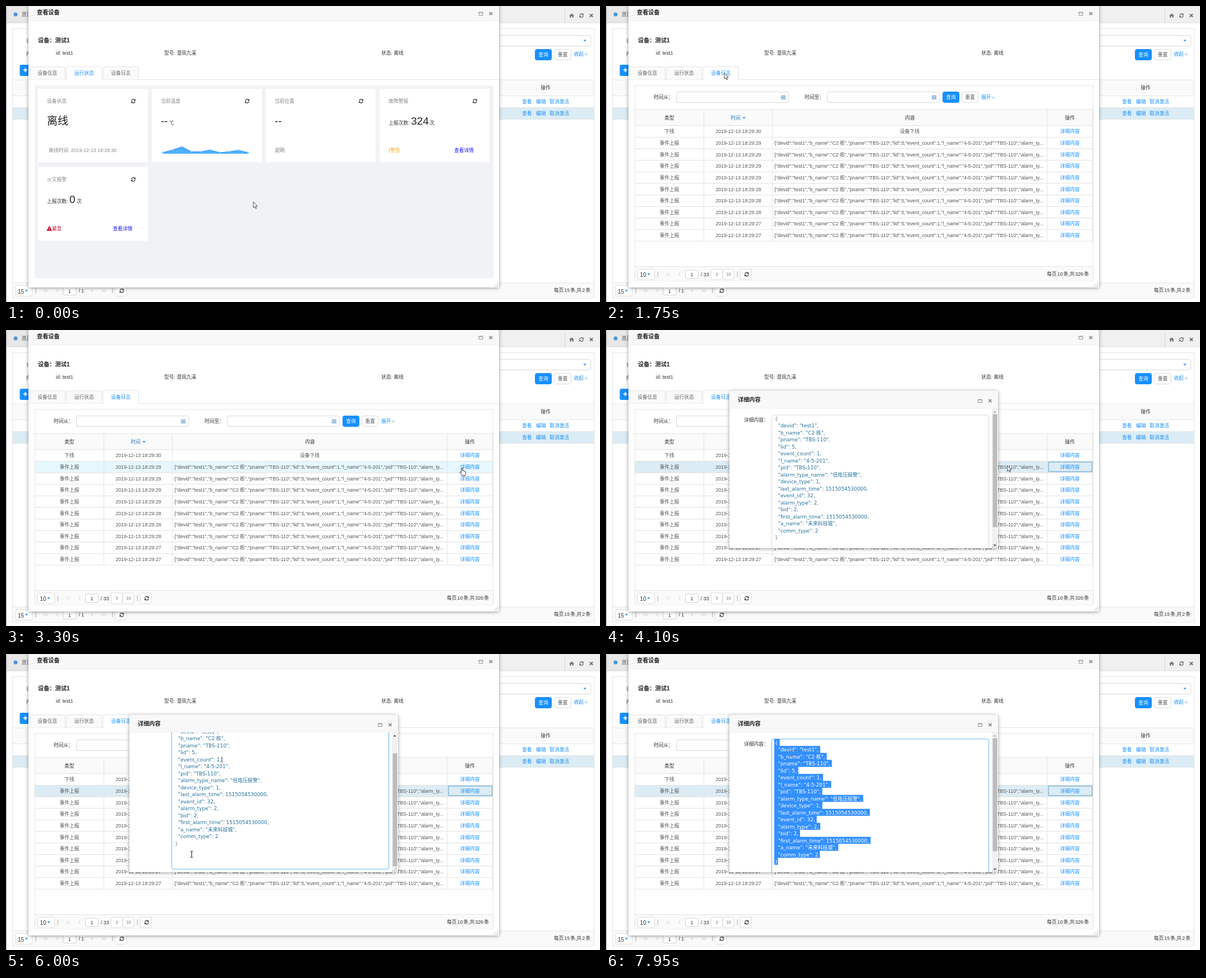
An HTML page that plays this animation: 1059 by 529 pixels, repeating every 8000 ms.

```html
<!DOCTYPE html>
<html lang="zh-CN">
<head>
<meta charset="utf-8">
<title>查看设备</title>
<style>
html, body { margin: 0; width: 100%; height: 100%; overflow: hidden; background: #fff; }
svg { display: block; font-family: "Liberation Sans", Arial, "Noto Sans CJK SC", "Noto Sans CJK", sans-serif; }
text { white-space: pre; }
.json text { font-family: "DejaVu Sans", "Noto Sans CJK SC", "Noto Sans CJK", sans-serif; }
.json .label { font-family: "Noto Sans CJK SC", "Noto Sans CJK", sans-serif; }
.total { word-spacing: -1.3px; }
.shadow { filter: drop-shadow(0 1px 3px rgba(0, 0, 0, .4)); }
#beam { mix-blend-mode: difference; }
</style>
</head>
<body>
<svg id="stage" width="1059" height="529" viewBox="0 0 1059 529"></svg>
<script>
const BLUE = '#1890ff', LINE = '#e4e4e4', TEXT = '#555', DARK = '#333', SIZE = 8.75;
const $ = id => document.getElementById(id);

// Drawing helpers: each returns SVG markup
const rect = (x, y, w, h, fill, stroke = 'none', r = 0, more = '') =>
  `<rect x="${x}" y="${y}" width="${w}" height="${h}" rx="${r}" fill="${fill}" stroke="${stroke}" ${more}/>`;
const path = (d, stroke, width = 1, fill = 'none', more = '') =>
  `<path d="${d}" stroke="${stroke}" stroke-width="${width}" fill="${fill}" ${more}/>`;
const line = (x1, y1, x2, y2, c = LINE, more = '') => path(`M${x1} ${y1}L${x2} ${y2}`, c, 1, 'none', more);
const text = (x, y, s, fill = TEXT, size = SIZE, more = '') =>
  `<text x="${x}" y="${y + size * .36}" font-size="${size}" fill="${fill}" ${more}>${s}</text>`;
const mid = (x, y, s, fill, more = '') => text(x, y, s, fill, SIZE, `text-anchor="middle" ${more}`);
const bold = (x, y, s) => text(x, y, s, '#222', 10.2, 'font-weight="bold"');
const total = (x, y, s) => text(x, y, s, DARK, SIZE, 'text-anchor="end" class="total"');
const at = (x, y, s) => `<g transform="translate(${x} ${y})">${s}</g>`;

const caret = (x, y, c = BLUE) => at(x, y, path('M-2.8-1.5h5.6L0 1.5z', 'none', 0, c));
const chevron = (x, y, d, c = BLUE) => at(x, y, path(`M-2.4 ${d}L0 ${-d}L2.4 ${d}`, c, .9));
const cross = (x, y, c, w = 1.8) => at(x, y, path('M-2.6-2.6L2.6 2.6M2.6-2.6L-2.6 2.6', c, w));
const refresh = (x, y, c = DARK) => at(x, y,
  path('M-3.2-.6A3.2 3.2 0 0 1 2.4-2.2M3.2 .6A3.2 3.2 0 0 1-2.4 2.2', c, 1.2) +
  path('M3.9-3.9v3.3h-3.3zM-3.9 3.9v-3.3h3.3z', 'none', 0, c));
const calendar = (x, y) => at(x, y,
  path('M-3.5-2.5h7v6h-7zM-3.5-.3h7M-3.5 1.6h7M-1.2-2.5v6M1.2-2.5v6M-2-4v2M2-4v2', '#6c9ccb', .8));
const grip = (x, y) => at(x, y,
  path('M0 0h1.2M-3 3h1.2M0 3h1.2M-6 6h1.2M-3 6h1.2M0 6h1.2', '#777', 1.2));
const windowIcons = (x, y) =>
  path(`M${x - 3.5} ${y - 2.5}h7v5.5h-7zM${x - 3.5} ${y - 1.5}h7`, '#888', .9) + cross(x + 17.8, y, '#888', 1.6);
const button = (x, y, s, primary) =>
  rect(x + .5, y + .5, 29, 19, primary ? BLUE : '#fff', primary ? BLUE : '#d9d9d9', 3) +
  mid(x + 15, y + 10, s, primary ? '#fff' : TEXT);
const field = (x, y, w, h = 20) => rect(x + .5, y + .5, w - 1, h - 1, '#fff', '#d9d9d9', 3.5);

function pager(x, y, size, pages, more) {
  const arrow = (cx, d, on) => path(`M${cx - d * 1.4} ${y - 3}l${d * 2.8} 3l${-d * 2.8} 3`, on ? '#555' : '#ccc');
  const box = (bx, w) => rect(bx + .5, y - 9.5, w, 19, '#fff', '#ddd', 3);
  const end = x + 118 + String(pages).length * 4.9;
  return box(x, 30) + text(x + 4.5, y + 1, size, DARK, 10) + caret(x + 20, y) +
    line(x + 36.5, y - 5, x + 36.5, y + 5, '#aaa') +
    arrow(x + 52, -1) + arrow(x + 56, -1) + arrow(x + 75, -1) +
    rect(x + 85.5, y - 7.5, 23, 15, '#fff', '#d0d0d0', 2) + mid(x + 97, y + .5, '1', DARK) +
    text(x + 113, y, '/ ' + pages, DARK) +
    (more ? box(end + 3, 20) + box(end + 24, 20) : '') +
    arrow(end + 14, 1, more) + arrow(end + 33, 1, more) + arrow(end + 37, 1, more) +
    line(end + 50.5, y - 5, end + 50.5, y + 5, '#aaa') + box(end + 55, 20) + refresh(end + 67, y);
}

function page() {
  const links = y => [[920, '查看'], [945, '编辑'], [969, '取消激活']].map(([x, s]) => text(x, y, s, BLUE)).join('');
  return rect(0, 0, 1059, 529, '#fff') + rect(0, 0, 1059, 30, '#f0f0f0') + line(0, 30, 1059, 30, '#ddd') +
    rect(2.5, .5, 90, 29, '#e8e8e8', '#d8d8d8') + '<circle cx="17" cy="15" r="3.5" fill="#4a94dc"/>' +
    text(28, 15, '首页') + line(996.5, 5, 996.5, 30, '#d5d5d5') +
    path('M1004 17.3l4.500-4 4.500 4h-1.200v3.400h-2.300v-2.500h-2v2.500h-2.300v-3.400z', 'none', 0, '#777') +
    refresh(1026, 17, '#666') + cross(1043.5, 17, '#666', 1.8) +
    rect(11.5, 40.5, 1037, 481.5, '#fff', LINE) +
    text(36, 62, '设备') + text(36, 86, '所属') + field(700, 52, 343) + caret(1032, 62) +
    button(943, 77, '查询', 1) + button(977.5, 77, '重置') + text(1012.5, 86, '收起', BLUE) + chevron(1034.5, 86.5, 1) +
    rect(24.5, 105, 50, 20, BLUE, 'none', 3) + path('M31 114.5h7M34.5 111v7', '#fff', 2) +
    rect(12, 132, 1036, 28, '#fafafa') + line(11, 132, 1048, 132) + line(11, 160.5, 1048, 160.5) + mid(962, 146, '操作', DARK) +
    links(171) + rect(12, 181, 1036, 21, '#dcecf5') + line(11, 181.5, 1048, 181.5) + line(11, 202.5, 1048, 202.5) + links(191.5) +
    rect(12, 495, 1036, 26.5, '#fafafa') + line(11, 495, 1048, 495) +
    pager(16.5, 509, 15, 1) + total(1042, 508, '每页 15 条,共 2 条') +
    line(.5, 0, .5, 529, '#9a99a5');
}

function modal() {
  return rect(40, -20, 839, 523, '#fff', 'none', 2, 'class="shadow"') + rect(40, 0, 839, 26, '#f8f8f8') +
    line(40, 26.5, 879, 26.5, '#eee') + bold(55, 11, '查看设备') + windowIcons(846.5, 13.5) +
    bold(57, 61, '设备：测试1') + text(89, 84, 'id: test1', DARK) +
    text(282, 84, '型号: 澄岚九溪', DARK) + text(669, 84, '状态: 离线', DARK) + grip(876, 495);
}

function tabs(active) {
  return line(40, 131.5, 879, 131.5) + ['设备信息', '运行状态', '设备日志'].map((s, i) => {
    const x = 42 + i * 65.5, on = i === active;
    return path(`M${x} 131.5V111q0-2.5 2.5-2.5h58.5q2.5 0 2.5 2.5V131.5`, LINE, 1, on ? '#fff' : '#fafafa') +
      (on ? line(x + .5, 131.5, x + 63, 131.5, '#fff') : '') +
      mid(x + 31.7, 120, s, on ? BLUE : '#666', i === 2 && !on ? 'id="logTab"' : '');
  }).join('');
}

function statusPanel() {
  const card = (x, y, title, body) => at(x, y,
    rect(0, 0, 196, 131.5, '#fff') + text(16, 22, title, '#888') + refresh(170, 22) + body);
  const big = (x, s) => text(x, 57.5, s, '#222', 19);
  const count = (n, end) => text(16, 60.5, '上报次数: ', DARK) + big(56, n) + text(end, 60.5, '次', DARK);
  const detail = x => text(x, 109.5, '查看详情', '#1515ff', SIZE, 'font-weight="500"');
  const ys = [114, 109.5, 104, 112.5, 112.5, 109.5, 114, 112.5, 110, 114];
  const pts = ys.map((y, i) => [20 + i * 16.8, y]);
  const chart = path(`M20 116L${pts.join('L')}L171 116z`, 'none', 0, '#50b0ff') + path('M' + pts.join('L'), BLUE, 1.2) +
    pts.map(([x, y]) => `<circle cx="${x}" cy="${y}" r="1.4" fill="#fff" stroke="${BLUE}" stroke-width=".7"/>`).join('');
  return tabs(1) + rect(51, 142, 818, 345, '#f0f2f5') +
    card(57, 148, '设备状态', big(16, '离线') + text(19, 109.5, '离线时间: 2019-12-13 18:29:30', '#888')) +
    card(260, 148, '当前温度', big(16, '--') + text(31, 60.5, '℃', DARK) + chart) +
    card(463, 148, '当前位置', big(16, '--') + text(16, 109.5, '说明', '#777')) +
    card(666, 148, '故障警报', count('324', 89) + text(16, 109.5, '<tspan font-weight="bold">!</tspan>警告', '#faad14') + detail(133)) +
    card(57, 288, '火灾报警', count('0', 69) + path('M20.3 105l4.5 8.5h-9z', '#c8002f', .5, '#c8002f') +
      path('M20.3 107.8v2.6M20.3 111.3v1.2', '#fff') + text(25, 109.5, '紧急', '#c8002f') + detail(133.5));
}

const ROW_TOP = 214, ROW_H = 20.62;
const rowText = '{"devid":"test1","b_name":"C2 栋","pname":"TBS-110","lid":5,"event_count":1,"l_name":"4-5-201","pid":"TBS-110","alarm_ty...';

function logPanel() {
  const filter = (x, s) => text(x, 163, s, DARK) + field(x + 40, 153, 201) + calendar(x + 231, 163);
  const rows = [30, 29, 29, 29, 29, 28, 28, 28, 27, 27].map((sec, i) => {
    const y = ROW_TOP + i * ROW_H, c = y + 10.3;
    return rect(51.5, y, 816, ROW_H, '#fff', LINE, 0, 'class="row"') +
      mid(113, c, i ? '事件上报' : '下线') + mid(236, c, '2019-12-13 18:29:' + sec) +
      (i ? text(300, c, rowText) : mid(541.5, c, '设备下线')) + mid(827, c, '详细内容', BLUE);
  }).join('');
  const columns = [174.5, 296.5, 786.5].map(x => line(x, 185, x, 420)).join('');
  return tabs(2) + rect(51.5, 142, 817, 349, '#fff', LINE) +
    filter(85, '时间从：') + filter(354, '时间至：') +
    button(600, 153, '查询', 1) + button(634, 153, '重置') + text(669, 163, '展开', BLUE) + chevron(690.5, 163.5, -1) +
    rect(51.5, 185, 816, 29, '#fafafa', LINE) + mid(113, 199.5, '类型', DARK) + mid(231, 199.5, '时间', '#3478b5') +
    caret(246, 200) + mid(542, 199.5, '内容', DARK) + mid(827, 199.5, '操作', DARK) +
    `<g id="rows">${rows}${columns}</g>` +
    rect(789, 236, 77.5, 17, 'none', '#5b9fc9', 0, 'id="focusCell"') +
    rect(52, 466, 816, 25, '#fafafa') + line(51, 465.5, 868, 465.5) + pager(56, 479.5, 10, 33, true) +
    total(861, 479, '每页 10 条,共 326 条');
}

const LINE_H = 12.5, LINES_TOP = 151.75;
const json = `{
"devid": "test1",
"b_name": "C2 栋",
"pname": "TBS-110",
"lid": 5,
"event_count": 1,
"l_name": "4-5-201",
"pid": "TBS-110",
"alarm_type_name": "低电压报警",
"device_type": 1,
"last_alarm_time": 1515054530000,
"event_id": 32,
"alarm_type": 2,
"bid": 2,
"first_alarm_time": 1515054530000,
"a_name": "未来科技城",
"comm_type": 2
}`.split('\n');

function dialog() {
  const last = json.length - 1;
  const lines = fill => json.map((s, i) =>
    text(i % last ? 306.8 : 301, LINES_TOP + 7 + i * LINE_H, s, fill || (i % last ? '#24719b' : '#6b7f8c'), 8.9)).join('');
  return `<defs><clipPath id="body">${rect(221, 140, 466, 250, '#000')}</clipPath>
    <clipPath id="picked"><path id="pickClip"/></clipPath></defs>` +
    rect(220, 108.5, 479, 281.5, '#fff', 'none', 2, 'class="shadow"') + rect(220, 109, 479, 31, '#f8f8f8') +
    line(220, 140, 699, 140, '#eee') + bold(235, 124, '详细内容') + windowIcons(667, 126.5) +
    '<g clip-path="url(#body)"><g id="content" class="json">' +
    text(246, 161, '详细内容：', DARK, SIZE, 'class="label"') +
    rect(295.5, 152, 387, 265, '#fff', '#d9d9d9', 3, 'id="area"') + `<g id="lines">${lines()}</g>` +
    line(385, 216, 385, 227, '#222', 'id="caret"') +
    `<path id="pick" fill="#3390ff"/><g clip-path="url(#picked)">${lines('#fff')}</g></g></g>` +
    rect(688, 140, 10, 250, '#f1f1f1') + rect(689.5, 150.5, 8, 202, '#bcbcbc', 'none', 0, 'id="thumb"') +
    path('M690.5 147.5h5l-2.5-3z', 'none', 0, '#aaa', 'id="up"') +
    path('M690.5 383.5h5l-2.5 3z', 'none', 0, '#444', 'id="down"') + grip(695, 382);
}

const cursors = `<g id="cursor">
  <path id="arrow" d="M0 0v10.5l2.4-2.2 1.7 3.7 1.6-.7-1.7-3.6h3.3z" fill="#fff" stroke="#222" stroke-width=".8"/>
  <path id="hand" d="M-1 7V.8a1 1 0 0 1 2 0V4.5q1.8-.6 2 .6 1.6-.4 1.9.6 1.6-.3 1.6 1v2.8q0 1-1 2.2v1.8h-5.5v-1.5L-3.6 8.3q-.8-1.3.3-1.7 1-.3 2.3 1.6z" fill="#fff" stroke="#222" stroke-width=".9"/>
  </g><path id="beam" d="M-2-5.5q2 0 2 1 0-1 2-1M0-4.5v9M-2 5.5q2 0 2-1 0 1 2 1" fill="none" stroke="#fff"/>`;

$('stage').innerHTML = page() + modal() + `<g id="status">${statusPanel()}</g><g id="log">${logPanel()}</g>
  <g id="dialog">${dialog()}</g>` + cursors;

// Motion tracks: [time, values...], eased between neighbours
const pointer = [[150, 441, 350], [750, 211, 120], [2200, 211, 120], [2850, 813, 268], [3050, 828, 257],
  [3300, 813, 247], [3550, 830, 249], [3850, 830, 249], [4600, 388, 222], [5350, 388, 222], [5800, 331, 358],
  [6150, 331, 358], [6200, 333, 358], [6300, 333, 358], [6750, 358, 275], [7200, 358, 275], [7650, 299, 153], [7950, 331, 178]];
const scrolling = [[5550, 0], [6000, 32.5], [6850, 32.5], [7060, 0]];
const smooth = p => p * p * (3 - 2 * p);
const progress = (t, from, length) => Math.min(1, Math.max(0, (t - from) / length));

function sample(track, t) {
  const i = track.findIndex(k => k[0] > t);
  if (i < 0) return track[track.length - 1].slice(1);
  if (!i) return track[0].slice(1);
  const a = track[i - 1], b = track[i], p = smooth((t - a[0]) / (b[0] - a[0]));
  return a.slice(1).map((v, j) => v + (b[j + 1] - v) * p);
}

const show = (id, on) => { $(id).style.display = on ? '' : 'none'; };
const set = (id, name, value) => $(id).setAttribute(name, value);
const rows = [...document.querySelectorAll('.row')];
const lineEls = [...$('lines').children];

// Nearest character edge to x
function edge(el, x) {
  const n = el.getNumberOfChars();
  for (let i = 0; i < n; i++) {
    const a = el.getStartPositionOfChar(i).x, b = el.getEndPositionOfChar(i).x;
    if (x < (a + b) / 2) return a;
  }
  return el.getEndPositionOfChar(n - 1).x;
}

// Selection runs from the dragged pointer to the end of the text
function selection(t) {
  if (t < 6350) return '';
  const drag = Math.min(t, 7650), [x, y] = sample(pointer, drag), [scroll] = sample(scrolling, drag);
  const first = Math.max(0, Math.floor((y + scroll - LINES_TOP) / LINE_H));
  return lineEls.map((el, i) => {
    if (i < first) return '';
    const from = i === first && x > 301 ? edge(el, x) : 300;
    const to = el.getEndPositionOfChar(el.getNumberOfChars() - 1).x + (i < json.length - 1 ? 3 : 0);
    return `M${from} ${LINES_TOP + i * LINE_H}H${to}v${LINE_H}H${from}z`;
  }).join('');
}

function draw(t) {
  const [x, y] = sample(pointer, t), [scroll] = sample(scrolling, t);
  const log = t >= 1150, picked = t >= 3800;
  show('status', !log);
  show('log', log);
  show('rows', t >= 1350);
  show('focusCell', picked);
  set('logTab', 'fill', x > 173 && x < 237 && y > 108 && y < 131 ? BLUE : '#666');

  const hover = x > 51 && x < 868 ? Math.floor((y - ROW_TOP) / ROW_H) : -1;
  rows.forEach((r, i) => r.setAttribute('fill', picked && i === 1 ? '#dcecf5' : !picked && i === hover ? '#e6f7ff' : '#fff'));

  const p = smooth(progress(t, 3800, 300)), s = .5 + p / 2;
  show('dialog', p > 0);
  set('dialog', 'opacity', p);
  set('dialog', 'transform', `translate(${459.5 * (1 - s)} ${249 * (1 - s)}) scale(${s})`);
  const f = progress(t, 4600, 250), mix = (a, b) => Math.round(a + (b - a) * f);
  set('area', 'stroke', `rgb(${mix(217, 100)},${mix(217, 184)},${mix(217, 246)})`);
  set('content', 'transform', `translate(0 ${-scroll})`);
  set('thumb', 'y', 150.5 + scroll * 27 / 32.5);
  set('up', 'fill', scroll > 0 ? '#444' : '#aaa');
  show('down', scroll < 32);
  show('caret', t >= 4650 && t < 6350);
  const d = selection(t);
  set('pick', 'd', d);
  set('pickClip', 'd', d);

  const beam = t >= 4150 && x > 295 && x < 683 && y > 140;
  const hand = !beam && log && t < 4150 && x > 808 && x < 847 && hover >= 0 && hover < 10;
  show('beam', beam);
  show('hand', hand);
  show('arrow', !beam && !hand);
  for (const id of ['cursor', 'beam']) set(id, 'transform', `translate(${x} ${y})`);
}

const STEP = 50, LOOP = 8000, start = performance.now();
function tick() {
  const t = (performance.now() - start) % LOOP;
  draw(Math.floor(t / STEP) * STEP);
  requestAnimationFrame(tick);
}
tick();
</script>
</body>
</html>
```
